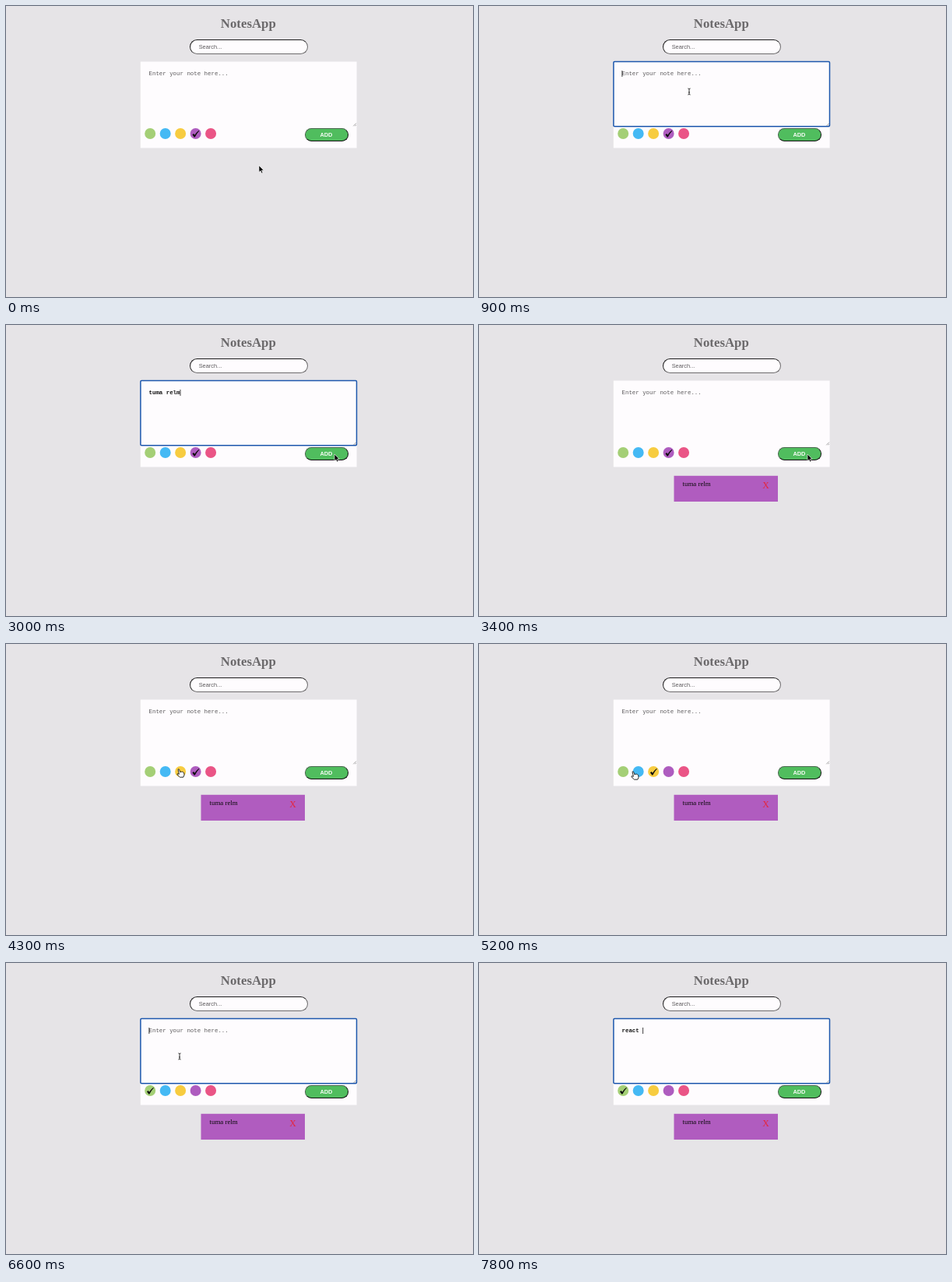
Animation, 600 px wide and 374 px high, one loop 8000 ms. Source, as an HTML page:

```html
<!DOCTYPE html>
<html lang="en">
<head>
<meta charset="utf-8">
<title>NotesApp</title>
<style>
  html, body { margin: 0; width: 100%; height: 100%; overflow: hidden; background: #e6e4e7; }
  svg { position: absolute; left: 0; top: 0; }
  .pill { position: absolute; box-sizing: border-box; border: 1.2px solid; }
  #search { left: 235.5px; top: 42.5px; width: 152px; height: 19px; border-radius: 9.5px;
    background: #fefcfe; border-color: #1c1b1c #6d6b6d #6d6b6d #1c1b1c; }
  #add { left: 384px; top: 157px; width: 55.5px; height: 16.5px; border-radius: 8.3px;
    background: #50bd5e; border-color: #4c6650 #111 #111 #4c6650; }
  .sans { font-family: "Liberation Sans", Arial, sans-serif; font-size: 7.4px; }
  .serif { font-family: "Liberation Serif", Times, serif; }
  .mono { font-family: "Liberation Mono", "Courier New", monospace; font-size: 7.42px; white-space: pre; }
</style>
</head>
<body>
<svg width="600" height="374">
  <rect x="172.8" y="71.5" width="277.8" height="111" fill="#fefcfe"/>
  <path d="M446.3 154.3l3.6-3.6M448.5 154.3l1.4-1.4" stroke="#777" stroke-width=".7"/>
</svg>
<div class="pill" id="search"></div>
<div class="pill" id="add"></div>
<svg width="600" height="374">
  <text class="serif" x="311.3" y="28.3" font-size="16.8" font-weight="bold" text-anchor="middle" fill="#6b696b">NotesApp</text>
  <text class="sans" x="247.7" y="54.7" fill="#5c5a5c">Search...</text>
  <text class="sans" x="411.4" y="168.2" font-weight="bold" text-anchor="middle" fill="#f4fbf4">ADD</text>
  <rect id="ring" x="172.9" y="71.6" width="277.6" height="83.2" rx="1.2" fill="none" stroke="#1d57ad" stroke-width="1.5"/>
  <text class="mono" id="hint" x="183.5" y="89.4" fill="#5c5a5c">Enter your note here...</text>
  <text class="mono" id="typed" x="183.5" y="89.4" font-weight="bold" fill="#111"></text>
  <path id="caret" d="M0 83v8" stroke="#111" stroke-width=".8"/>
  <g id="dots"></g>
  <path id="check" d="M-4.2 1.2l1.6-1.3 1.5 1.7Q1.2-2 4-4.2l.7.6Q1.4-.2-.8 4.2l-1.3.2Q-2.6 2.6-4.2 1.2z" fill="#0b0b0b"/>
  <g id="note">
    <rect x="250.5" y="193.8" width="133.5" height="33.2" fill="#b05cbf"/>
    <text class="serif" x="261.5" y="207" font-size="8.9" fill="#0b0b0b" id="noteText"></text>
    <text class="serif" x="364.2" y="210" font-size="11.8" fill="#e5253c">X</text>
  </g>
  <g id="pointer" stroke-linejoin="round">
    <path id="arrow" d="M0 0v8.6l2-1.8 1.4 3.1 1.5-.7-1.4-3h2.7z" fill="#000" stroke="#fff" stroke-width=".6"/>
    <path id="hand" d="M-1 .2q1-1 1.8.3l1 3.2 1.5-.5 1.3.1 1.1.5 1 .8.3 2.8-1.2 2.8H1.5L-2 6.8q-.6-1.5 1.2-.9L.4 6.3z" fill="#fff" stroke="#111" stroke-width=".9"/>
    <path id="beam" d="M-1.6-4Q0-4 0-3Q0-4 1.6-4M0-3V3M-1.6 4Q0 4 0 3Q0 4 1.6 4M-1 1H1" fill="none" stroke="#222" stroke-width=".9"/>
  </g>
</svg>
<script>
const LOOP = 8000, STEP = 100, CHAR = 7.42 * 0.6;
const NAME = "tuma relm", WORD = "react ";
const $ = id => document.getElementById(id);
const dotX = i => 185.2 + 19.47 * i;

// Each entry holds from its time until the next one.
const typing = [
  [0, ""], [500, ""], [1400, NAME.slice(0, 1)], [1500, NAME.slice(0, 2)],
  [1700, NAME.slice(0, 4)], [1800, NAME.slice(0, 7)], [1900, NAME.slice(0, 8)], [2000, NAME],
  [3300, ""], [6500, ""],
  [7200, WORD.slice(0, 1)], [7300, WORD.slice(0, 2)], [7400, WORD.slice(0, 3)],
  [7600, WORD.slice(0, 4)], [7700, WORD.slice(0, 5)], [7800, WORD]
];
const checked = [[0, 3], [4500, 2], [5700, 0]];
const path = [
  [0, 325, 205], [100, 325, 205], [500, 270, 110], [2200, 270, 110], [2900, 422, 166],
  [3400, 422, 166], [3900, 315, 112], [4300, 222, 161], [4700, 222, 161], [5200, 198, 164],
  [5600, 185, 163], [6100, 185, 163], [6500, 223, 120], [8000, 223, 120]
];

const current = (list, t) => list.findLast(entry => entry[0] <= t);
const between = (t, from, to) => t >= from && t < to;
const show = (id, on) => $(id).style.display = on ? "" : "none";
const move = (id, x, y) => $(id).setAttribute("transform", `translate(${x} ${y})`);

function pointerAt(t) {
  const i = path.findLastIndex(p => p[0] <= t);
  const [t0, x0, y0] = path[i], [t1, x1, y1] = path[i + 1];
  const u = (t - t0) / (t1 - t0), ease = u * u * (3 - 2 * u);
  return [x0 + (x1 - x0) * ease, y0 + (y1 - y0) * ease];
}

function draw(t) {
  const [since, text] = current(typing, t);
  const focused = between(t, 500, 3300) || t >= 6500;
  show("ring", focused);
  show("hint", !text);
  $("typed").textContent = text;
  show("caret", focused && (t - since) % 1000 < 500);
  move("caret", 183.9 + CHAR * text.length, 0);
  move("check", dotX(current(checked, t)[1]), 164.2);
  show("note", t >= 3300);

  const [x, y] = pointerAt(t);
  const overText = between(x, 173, 450) && between(y, 72, 155);
  const overDots = between(x, 178, 271) && between(y, 156, 172);
  move("pointer", x, y);
  show("pointer", !between(t, 1400, 2200) && t < 7200);
  show("beam", overText);
  show("hand", overDots);
  show("arrow", !overText && !overDots);
}

$("dots").innerHTML = ["#a4cf76", "#45b9f4", "#f7cc40", "#ae5cbf", "#ea5586"]
  .map((color, i) => `<circle cx="${dotX(i)}" cy="164" r="7" fill="${color}"/>`).join("");
$("noteText").textContent = NAME;

const start = performance.now();
function frame() {
  const t = (performance.now() - start) % LOOP;
  draw(Math.floor(t / STEP) * STEP);
  requestAnimationFrame(frame);
}
frame();
</script>
</body>
</html>
```
